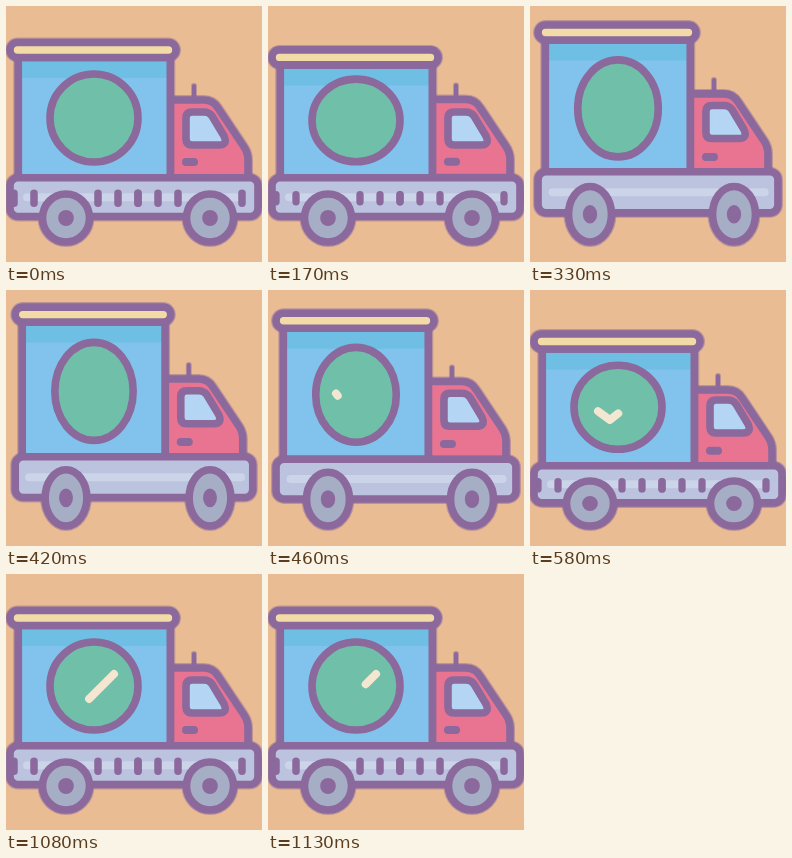
Write an HTML page with a canvas that moves like this. It is 256 px wide and 256 px high and loops after 1210 ms.

```html
<!DOCTYPE html>
<html lang="en">
<head>
<meta charset="utf-8">
<title>Delivery truck</title>
<style>
  html, body { margin: 0; width: 100%; height: 100%; overflow: hidden; background: #eabc93; }
  canvas { display: block; width: 100vw; height: 100vh; }
</style>
</head>
<body>
<canvas id="stage" width="256" height="256"></canvas>
<script>
const ctx = document.getElementById('stage').getContext('2d');
const LOOP = 1210, FPS = 24, LAST_STEP = 27;
const C = {
  bg: '#eabc93', ink: '#8b699c', halo: 'rgba(139,105,156,.48)',
  blue: '#82c3ed', shade: '#6ebfe3', green: '#70c0a9', roof: '#f2dba6',
  red: '#e97491', bed: '#bbc3df', shine: '#ccd4ea', tyre: '#a5aec4',
  glass: '#b4d5f3', tick: '#f3e7d2'
};

const clamp = x => Math.max(0, Math.min(1, x));
const smooth = x => clamp(x) ** 2 * (3 - 2 * clamp(x));

// The picture changes in steps, on times rounded to 10 ms.
function stepAt(t) {
  let k = 0;
  while (Math.round((k + 1) * 100 / FPS) * 10 <= t) k++;
  return Math.min(k, LAST_STEP);
}

// Soft hump: 1 at the centre, 0 beyond half its width.
const hump = (k, centre, half) =>
  Math.cos(Math.PI / 2 * Math.min(1, Math.abs(k - centre) / half)) ** 2;

// Crouch, leap, then landing.
const bounce = (k, crouch, leap, land, peak = 9.2) =>
  crouch * hump(k, 4.5, 2.5) - leap * hump(k, peak, 4.5) + land * hump(k, 14.2, 3.8);

function rounded(x1, y1, x2, y2, r) {
  const p = new Path2D();
  p.roundRect(x1, y1, x2 - x1, y2 - y1, r);
  return p;
}
function oval(x, y, rx, ry) {
  const p = new Path2D();
  p.ellipse(x, y, rx, ry, 0, 0, Math.PI * 2);
  return p;
}
function line(...pts) {
  const p = new Path2D();
  pts.forEach(([x, y], i) => i ? p.lineTo(x, y) : p.moveTo(x, y));
  return p;
}
function shifted(d, x, y) {
  const p = new Path2D();
  p.addPath(new Path2D(d), new DOMMatrix().translate(x, y));
  return p;
}
function stroke(p, color, width) {
  ctx.strokeStyle = color;
  ctx.lineWidth = width;
  ctx.stroke(p);
}
function fill(p, color) {
  ctx.fillStyle = color;
  ctx.fill(p);
}
function part(p, color) {
  fill(p, color);
  stroke(p, C.ink, 7.6);
}

// Part of the tick between two shares of its length; (80, 128) is its corner.
function tick(from, to, dy, tall) {
  const short = Math.hypot(12, 11), long = Math.hypot(28, 28);
  const at = share => {
    const d = share * (short + long) - short;
    const [x, y] = d < 0 ? [d * 12 / short, d * 11 / short] : [d * 28 / long, -d * 28 / long];
    return [80 + x, 128 + dy + y * tall];
  };
  const corner = short / (short + long), path = [at(from)];
  if (from < corner && to > corner) path.push(at(corner));
  stroke(line(...path, at(to)), C.tick, 8);
}

function draw(t) {
  const k = stepAt(t);
  const inset = 5.4 * hump(k, 9.5, 4.5);
  const roofY = 36.5 + bounce(k, 8.2, 21, 7.5);
  const bedMove = bounce(k, 0, 6.4, 4, 8.6);
  const cabMove = bounce(k, -.5, 6.4, 6, 8.6);
  const glassMove = bounce(k, 0, 6.8, 4, 8.6) - 1;
  const discR = bounce(k, -3, -5.4, -2);
  const wheelTop = 184 + bounce(k, 0, 9, 3);
  const ribs = clamp((Math.abs(k - 9) - 2.4) / 3.6);

  ctx.fillStyle = C.bg;
  ctx.fillRect(0, 0, 256, 256);
  ctx.lineCap = ctx.lineJoin = 'round';

  const left = 12.3 + inset * .75, right = 164.3 - inset;
  const top = 171.8 + bedMove, base = 210.5 + bedMove * .6;
  const roof = rounded(4 + inset, roofY, 170 - inset, roofY + 15, 7.5);
  const box = rounded(left, roofY + 15, right, top, 0);
  const bed = rounded(4 + inset, top, 252 - inset, base, 8);
  const cab = shifted('M164.5 94H198Q207 94 212 102L238 141Q242 147 242 154V172H164.5Z', -inset, cabMove);
  const glass = shifted('M186 107H198Q203 107 206 111L218 131Q222 140 213 140H186Q180 140 180 134V113Q180 107 186 107Z', -inset, glassMove);
  const mast = line([188 - inset, 80 + cabMove], [188 - inset, 92 + cabMove]);
  const handleY = 156 + cabMove * .8;

  const wheelY = (wheelTop + 240) / 2, wheelRy = 236 - wheelY;
  const wheelRx = 23.5 - inset * .5;
  const axles = [60, 204];
  const wheels = axles.map(x => oval(x, wheelY, wheelRx, wheelRy));

  for (const p of [roof, box, bed, cab, ...wheels]) stroke(p, C.halo, 10);
  stroke(mast, C.halo, 6);

  stroke(mast, C.ink, 4);
  part(cab, C.red);
  part(glass, C.glass);
  stroke(line([180 - inset, handleY], [188 - inset, handleY]), C.ink, 8);

  fill(box, C.blue);
  fill(rounded(left, roofY + 15, right, roofY + 35.5, 0), C.shade);
  stroke(box, C.ink, 7.6);
  part(roof, C.roof);

  part(oval(88, 112 + bounce(k, 2.7, 11.5, 5.3), 44 - inset * .92, 44 + discR), C.green);
  const drawn = smooth((k - 10) / 8), erased = clamp((k - 25) * .37);
  if (drawn > 0) tick(erased, drawn, bounce(k, 0, 15, 2), 1 + discR / 10);

  fill(bed, C.bed);
  const mid = (top + base) / 2;
  stroke(line([21 + inset * .4, mid], [233 + inset * .4, mid]), C.shine, 8);
  if (ribs > 0) {
    const half = 5 * ribs;
    for (const gap of [0, 20, 40, 104, 124])
      for (const x of [132 - gap, 132 + gap])
        stroke(line([x, mid + 1 - half], [x, mid + 1 + half]), C.ink, 7.5 * Math.min(1, ribs + .25));
  }
  stroke(bed, C.ink, 7.6);

  wheels.forEach((p, n) => {
    part(p, C.tyre);
    fill(oval(axles[n], wheelY, wheelRx / 3, wheelRy / 3), C.ink);
  });
}

const begin = performance.now();
function play() {
  draw((performance.now() - begin) % LOOP);
  requestAnimationFrame(play);
}
play();
</script>
</body>
</html>
```
